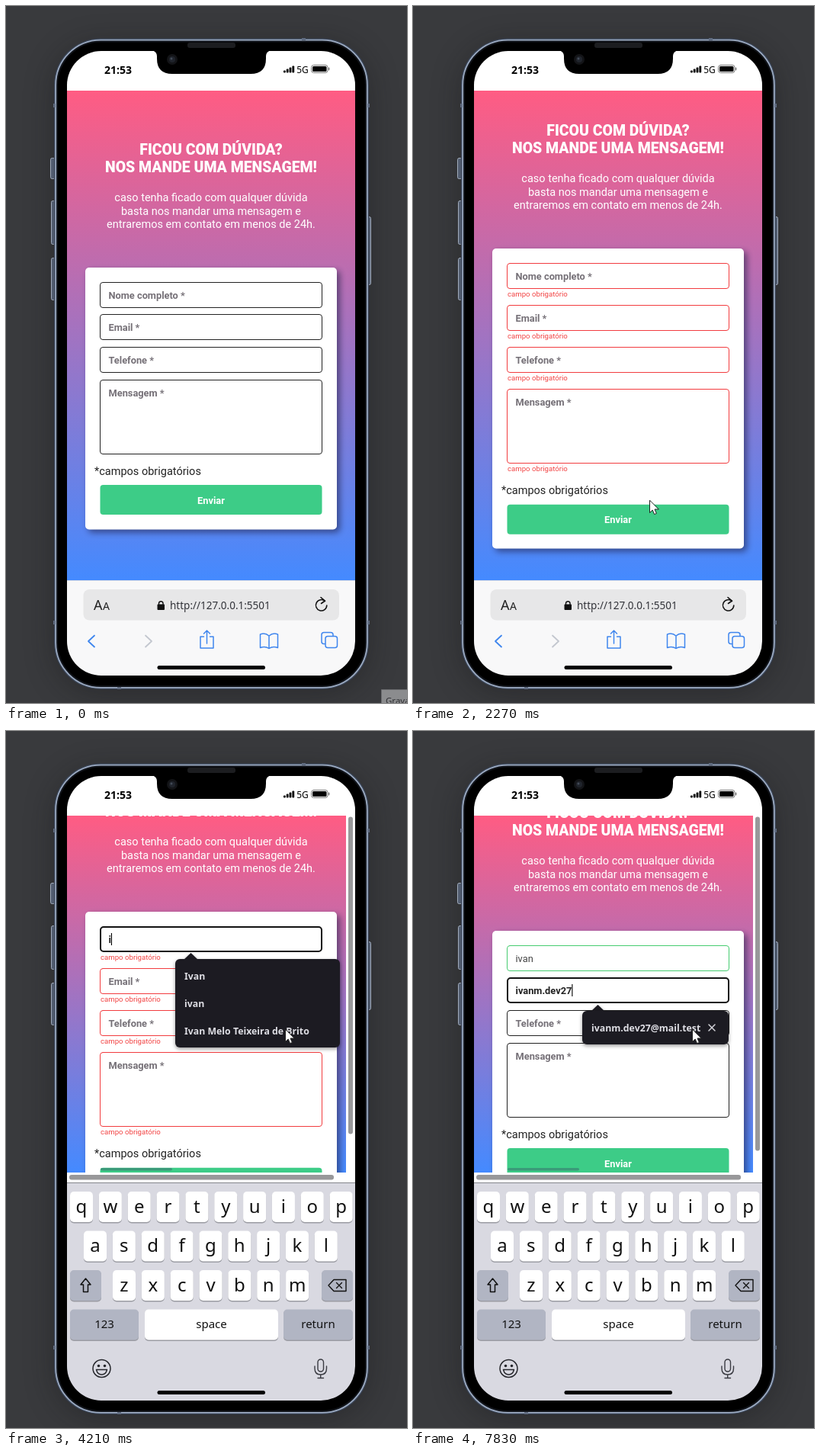
Animation of 526x914 px, one loop 8 s. Source, as an HTML page with a canvas:

```html
<!DOCTYPE html>
<html lang="pt">
<head>
<meta charset="utf-8">
<title>Formulário de contato</title>
<style>
html, body { margin: 0; width: 100%; height: 100%; overflow: hidden; background: #393a3d; }
canvas { display: block; width: 526px; height: 914px; }
</style>
</head>
<body>
<canvas id="stage"></canvas>
<script>
const W = 526, H = 914, LOOP = 8000;
const canvas = document.getElementById('stage');
const g = canvas.getContext('2d');
const dpr = window.devicePixelRatio || 1;
canvas.width = W * dpr;
canvas.height = H * dpr;

const UI = '"Noto Sans", "Open Sans", sans-serif';
const WEB = 'Roboto, sans-serif';
const BLUE = '#3f86ee';

const NAMES = ['Ivan', 'ivan', 'Ivan Melo Teixeira de Brito', 'asdasd', 'junior', 'remoto'];
const MAILS = ['ivanmtdb27@mail.test', 'ivanm.dev27@mail.test', 'ivanm'];
const NAME_KEYS = [4210, 4280, 4480, 4540];
const MAIL_KEYS = [5820, 5900, 5980, 6080, 6560, 7020, 7160, 7230, 7430, 7760, 7830];

// ---- helpers ----
const clamp = v => Math.max(0, Math.min(1, v));
const lerp = (a, b, k) => a + (b - a) * k;
const ease = k => k * k * (3 - 2 * k);
const between = (t, a, b) => t >= a && t < b;
const typed = (text, times, t) => text.slice(0, times.filter(x => t >= x).length);

// stepped progress from a to b, as the recording samples it
function progress(t, a, b, steps) {
  return clamp(Math.floor((t - a) / (b - a) * steps + 1e-6) / steps);
}

function box(x, y, w, h, r, fill, stroke, lw = 1) {
  g.beginPath();
  g.roundRect(x, y, w, h, r);
  if (fill) { g.fillStyle = fill; g.fill(); }
  if (stroke) { g.strokeStyle = stroke; g.lineWidth = lw; g.stroke(); }
}

function text(s, x, y, font, color, align = 'left') {
  g.font = font;
  g.fillStyle = color;
  g.textAlign = align;
  g.textBaseline = 'alphabetic';
  g.fillText(s, x, y);
}

function path(d, stroke, lw, fill) {
  const p = new Path2D(d);
  if (fill) { g.fillStyle = fill; g.fill(p); }
  if (stroke) {
    g.strokeStyle = stroke;
    g.lineWidth = lw;
    g.lineJoin = g.lineCap = 'round';
    g.stroke(p);
  }
}

function disc(x, y, r, fill, stroke, lw) {
  g.beginPath();
  g.arc(x, y, r, 0, Math.PI * 2);
  if (fill) { g.fillStyle = fill; g.fill(); }
  if (stroke) { g.strokeStyle = stroke; g.lineWidth = lw; g.stroke(); }
}

function shadow(color, blur, x, y, draw) {
  g.save();
  g.shadowColor = color;
  g.shadowBlur = blur * dpr;
  g.shadowOffsetX = x * dpr;
  g.shadowOffsetY = y * dpr;
  draw();
  g.restore();
}

// ---- phone ----
function body() {
  g.fillStyle = '#393a3d';
  g.fillRect(0, 0, W, H);
  shadow('rgba(20,20,22,.45)', 40, 0, 6, () => box(66, 48, 407, 844, 58, '#222'));
  for (const [x, y, w, h] of [[58, 199, 7, 28], [59, 255, 6, 58], [59, 330, 6, 56], [474, 276, 5, 90]]) {
    box(x + .5, y + .5, w - 1, h - 1, 2, '#525d70', '#a0aabb');
  }
  box(63, 42.5, 413, 853.5, 61, '#3b4659');
  box(65.2, 44.7, 408.6, 849.1, 59, '#12151b', '#9cabc2', 1.8);
  box(68, 47.5, 403, 843.5, 56, '#000');
  g.fillStyle = '#5f6b80';
  for (const [x, y] of [[62, 128], [474, 128], [62, 806], [474, 806]]) g.fillRect(x, y, 3, 5);
  g.fillRect(388, 42, 5, 3);
  g.fillRect(146, 893, 5, 3);
  box(238, 48, 63, 7, 3, '#1c1d20');
}

function statusBar() {
  g.fillStyle = '#fff';
  g.fillRect(80, 59, 378, 52);
  text('21:53', 147, 88.5, '700 14px ' + UI, '#000', 'center');
  for (let i = 0; i < 4; i++) box(364 + i * 3.8, 84.5 - i * 2, 2.8, 3 + i * 2, 1, '#000');
  text('5G', 389, 87.5, '500 12px ' + UI, '#000', 'center');
  box(400.5, 77.5, 21.5, 10, 3, null, '#777');
  box(402, 79, 18.5, 7, 1.5, '#000');
  box(423, 80.5, 1.3, 4, 1, '#777');
  path('M190 58 Q198 59 198 66 V69 Q198 89 218 89 H321 Q341 89 341 69 V66 Q341 59 349 58 Z', null, 0, '#000');
  disc(218, 70, 7, '#131417');
  disc(218, 70, 4, '#20242c');
  disc(217, 69, 1.5, '#424a57');
}

function toolbar() {
  g.fillStyle = '#f8f8f9';
  g.fillRect(80, 753, 378, 125);
  g.fillStyle = '#dcdfe6';
  g.fillRect(80, 753, 378, 1);
  box(101.5, 765, 335.5, 40.5, 8, '#e7e7e8');
  text('A', 115, 792, '300 18px ' + UI, '#222');
  text('A', 127, 792, '300 14px ' + UI, '#222');
  box(198.5, 784.5, 9.5, 7.5, 1, '#111');
  path('M200.5 785 V783 A2.8 2.8 0 0 1 206 783 V785', '#111', 1.4);
  text('http://127.0.0.1:5501', 215, 791, '400 13.5px ' + UI, '#33343a');
  path('M418.5 780.5 A7.2 7.2 0 1 0 420.8 786 M413 775.5 L418.5 780 L413.5 783.5', '#111', 1.6);
  path('M116 825.5 L108 833 L116 840.5', BLUE, 1.8);
  path('M183 825.5 L191 833 L183 840.5', '#c3c7cf', 1.8);
  path('M259.5 827 H255 V842 H272 V827 H267.5 M263.5 836 V819.5 M259.5 823 L263.5 819 L267.5 823', BLUE, 1.5);
  path('M345 826 Q340 821.5 333.5 824 V841.5 Q340 839 345 842.5 Q350 839 356.5 841.5 V824 Q350 821.5 345 826 V842', BLUE, 1.5);
  box(414, 821.5, 15, 15, 3, null, BLUE, 1.5);
  box(419, 826.5, 15.5, 15, 3, '#f8f8f9', BLUE, 1.5);
}

function key(x, y, w, label, size, gray) {
  box(x, y + 1, w, 40.5, 5, '#9b9ca3');
  box(x, y, w, 40, 5, gray ? '#b1b5c3' : '#fff');
  if (label) text(label, x + w / 2, y + 20 + size * .32, `400 ${size}px ${UI}`, '#111', 'center');
}

function keyboard(top) {
  g.save();
  g.translate(0, top - 592);
  g.fillStyle = '#d9d9e1';
  g.fillRect(80, 592, 378, 290);
  g.fillStyle = '#85868c';
  g.fillRect(80, 592, 378, 1);
  [['qwertyuiop', 84, 604], ['asdfghjkl', 102, 655.5], ['zxcvbnm', 140, 707]].forEach(([row, x, y]) =>
    [...row].forEach((ch, i) => key(x + i * 37.85, y, 30, ch, 24)));
  key(84, 707, 41, '', 0, true);
  path('M104.5 718 L111 726 H107.5 V735.5 H101.5 V726 H98 Z', '#111', 1.5);
  key(414, 707, 41, '', 0, true);
  path('M423 727 L430 719.5 H446 V734.5 H430 Z M433.5 723.5 L440.5 730.5 M440.5 723.5 L433.5 730.5', '#111', 1.4);
  key(84, 758.5, 90, '123', 15, true);
  key(182, 758.5, 175, 'space', 15);
  key(364, 758.5, 91, 'return', 15, true);
  disc(125.5, 836, 11.5, null, '#26272c', 1.5);
  disc(121.5, 832.5, 1.8, '#26272c');
  disc(129.5, 832.5, 1.8, '#26272c');
  path('M118.5 837.5 H132.5 Q131 844 125.5 844 Q120 844 118.5 837.5 Z', '#26272c', 1.4);
  box(409, 824, 7.5, 16, 4, null, '#3a3b42', 1.4);
  path('M405 833 V836 Q405 844 412.7 844 Q420.5 844 420.5 836 V833 M412.7 844 V848 M409 848.5 H416.5', '#3a3b42', 1.4);
  g.restore();
}

// ---- page ----
function field(top, h, label, value, opt) {
  const { focus, error, caret, border } = opt;
  const y = Math.floor(top);
  const color = border || (focus ? '#111' : error ? '#f23c3f' : '#222');
  if (focus) box(124, y + 1, 290, h - 1, 4, '#fff', color, 2);
  else box(123.5, y + .5, 291, h, 3.5, '#fff', color);
  const font = (value && !focus ? '400' : '700') + ' 12.8px ' + WEB;
  text(value || label, 134.5, y + 22, font, value ? (focus ? '#222' : '#444') : '#757077');
  if (caret) {
    g.fillStyle = '#000';
    g.fillRect(134.5 + (value ? g.measureText(value).width : 0), y + 9, 1.1, 16);
  }
  if (error) text('campo obrigatório', 124, y + h + 10.5, '400 9.65px ' + WEB, '#f24545');
}

function page(s) {
  const { t, bottom, top, error, scroll } = s;
  const end = scroll ? 579 : bottom;
  g.save();
  g.beginPath();
  g.rect(80, 111, scroll ? 366 : 378, end - 111);
  g.clip();
  const grad = g.createLinearGradient(0, 111, 0, end);
  grad.addColorStop(0, '#ff5c83');
  grad.addColorStop(1, '#448aff');
  g.fillStyle = grad;
  g.fillRect(80, 111, 378, end - 111);

  const head = '900 19.45px ' + WEB, para = '400 14.5px ' + WEB;
  text('FICOU COM DÚVIDA?', 269, top - 148, head, '#fff', 'center');
  text('NOS MANDE UMA MENSAGEM!', 269, top - 125, head, '#fff', 'center');
  ['caso tenha ficado com qualquer dúvida', 'basta nos mandar uma mensagem e', 'entraremos em contato em menos de 24h.']
    .forEach((line, i) => text(line, 269, top - 87 + i * 17.5, para, '#fff', 'center'));

  shadow('rgba(30,30,70,.6)', 9, 4, 4, () => box(104, top, 330, error ? 393.5 : 343.5, 5, '#fff'));

  const name = typed('ivan', NAME_KEYS, t), mail = typed('ivanm.dev27', MAIL_KEYS, t);
  const inName = between(t, 3340, 4880), inMail = t >= 4880;
  let border = null;
  if (t >= 4950) {
    const k = clamp((t - 4950) / 130);
    border = `rgb(${lerp(20, 70, k)},${lerp(20, 204, k)},${lerp(20, 112, k)})`;
  }
  const gap = error ? 55.3 : 42.7;
  const y = top + 19;
  field(y, 33, 'Nome completo *', name, { focus: inName, error, border, caret: inName && !between(t, 3880, 4210) });
  field(y + gap, 33, 'Email *', mail, { focus: inMail, error: error && !inMail, caret: inMail && !between(t, 5420, 5820) });
  field(y + gap * 2, 33, 'Telefone *', '', { error });
  field(y + gap * 3, 97, 'Mensagem *', '', { error });
  text('*campos obrigatórios', 116, top + (error ? 322 : 272), para, '#222');
  box(123.5, top + s.button, 291, 39, 4, s.hover ? '#38c27f' : '#3dcc87');
  text('Enviar', 269, top + s.button + 24.5, '700 12.8px ' + WEB, '#fff', 'center');
  if (scroll) box(124, 573, 94, 3.5, 2, '#3a9a79');
  g.restore();

  if (scroll) {
    g.fillStyle = '#fff';
    g.fillRect(446, 111, 12, 481);
    g.fillRect(80, 579, 378, 13);
    box(449, 112.5, 6, error ? 416 : 438, 3, '#98989a');
    box(83, 582, 347, 6.5, 3, '#98989a');
  }
}

function popup(y, w, items, closeX) {
  const h = items.length * 36 + 8;
  shadow('rgba(0,0,0,.4)', 5, 0, 2, () => {
    path(`M233 ${y + 1} L242.5 ${y - 8} L252 ${y + 1} Z`, null, 0, '#1c1b22');
    box(222, y, w, h, 6, '#1c1b22');
  });
  items.forEach((s, i) => text(s, 234, y + 27 + i * 36, '600 12.3px ' + UI, '#dedee4'));
  if (closeX) path(`M388 ${y + 18} l8 8 m0 -8 l-8 8`, '#d5d5da', 1.5);
}

function cursor(x, y, beam) {
  if (beam) {
    const d = `M${x - 3.5} ${y - 7.5} H${x + 3.5} M${x} ${y - 7.5} V${y + 7.5} M${x - 3.5} ${y + 7.5} H${x + 3.5}`;
    path(d, 'rgba(255,255,255,.8)', 2.4);
    path(d, '#111', 1.1);
  } else {
    path(`M${x + .5} ${y + .5} v16 l3.7 -3.5 l2.4 5.6 l2.8 -1.2 l-2.4 -5.4 h5 Z`, '#222', 1, '#fff');
  }
}

// pointer tip: [start, end, steps, from, to]
const MOVES = [
  [330, 1100, 11, [296, 727], [228, 377]],
  [1170, 1171, 1, [224, 375], [224, 375]],
  [1500, 2060, 8, [248, 442], [310, 648]],
  [2270, 2750, 6, [310, 648], [262, 348]],
  [3340, 3550, 3, [262, 348], [366, 391]]
];

function pointer(t) {
  const m = MOVES.filter(v => t >= v[0]).pop();
  if (!m) return null;
  const k = ease(progress(t, m[0], m[1], m[2]));
  return [lerp(m[3][0], m[4][0], k), lerp(m[3][1], m[4][1], k)];
}

function draw(t) {
  g.setTransform(dpr, 0, 0, dpr, 0, 0);
  const typing = t >= 3340;
  const error = between(t, 2130, 4950);
  const rise = progress(t, 3340, 3550, 3);
  const bottom = typing ? lerp(824, 592, 1 - (1 - rise) ** 2) : 753;
  const top = Math.floor((111 + bottom) / 2 - (error ? 114 : 89));
  const button = error ? 335.7 : 285;
  const tip = pointer(t);
  const inside = (a, b) => tip && tip[0] > 124 && tip[0] < 414 && tip[1] >= top + a && tip[1] <= top + b;
  const hover = !typing && inside(button, button + 39);

  body();
  g.save();
  g.beginPath();
  g.roundRect(80, 59, 378, 819, 45);
  g.clip();
  statusBar();
  page({ t, bottom, top, error, button, hover, scroll: t >= 3550 });
  if (typing) keyboard(bottom);
  else toolbar();
  box(198.5, 865, 141.5, 5, 2.5, '#000');
  g.restore();

  if (between(t, 3340, 4210)) popup(441, 216, NAMES);
  else if (between(t, 4210, 4880)) popup(299, 216, NAMES.slice(0, 3));
  else if (t >= 7020) popup(367, 192, [MAILS[1]], t >= 7300);
  else if (t >= 5820) popup(367, 192, MAILS, true);

  if (tip) {
    if (between(t, 2130, 2200) || between(t, 3340, 3410)) disc(tip[0], tip[1], 12, 'rgba(232,166,60,.85)');
    cursor(tip[0], tip[1], !typing && inside(19, error ? 283 : 245));
  }
  if (t < 70) {
    box(492.5, 896.5, 40, 24, 0, '#8b8c8e', '#6c6d70');
    text('Grava', 498, 914.5, '400 11.5px ' + UI, '#303134');
  }
}

const start = performance.now();
function tick(now) {
  draw(Math.max(0, now - start) % LOOP);
  requestAnimationFrame(tick);
}
draw(0);
requestAnimationFrame(tick);
</script>
</body>
</html>
```
